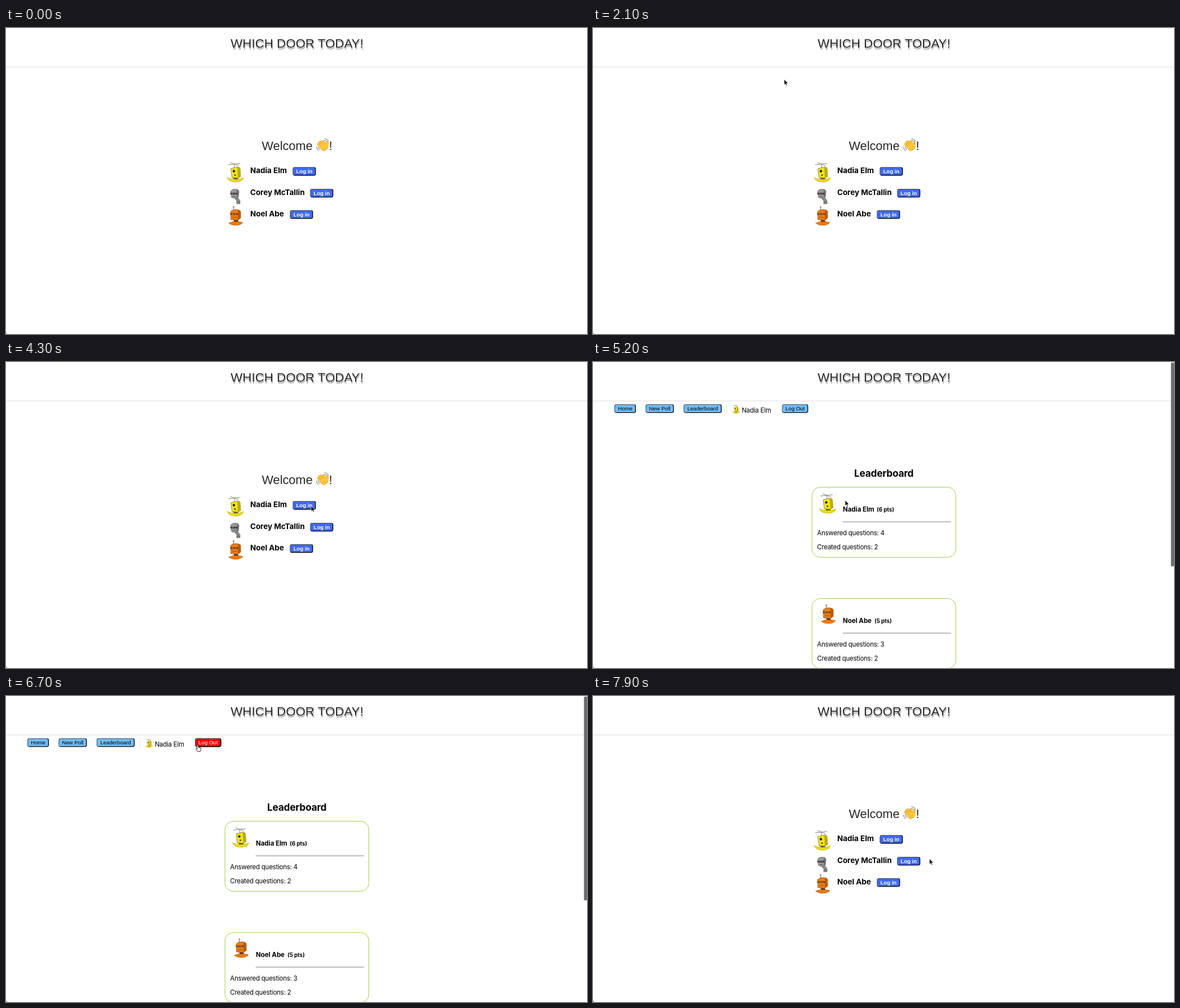
Animation of 1030x544 px, one loop 8 s. Source, as an HTML page:

```html
<!DOCTYPE html>
<html lang="en">
<head>
<meta charset="utf-8">
<title>Poll app</title>
<style>
html, body { margin: 0; width: 100%; height: 100%; overflow: hidden; background: #fff; }
svg { display: block; width: 1030px; height: 544px; }
text { white-space: pre; }
.ui { font-family: Inter, "Noto Sans", sans-serif; fill: #000; }
.reg { font-size: 11.45px; letter-spacing: -.22px; }
.name { font-size: 13.4px; font-weight: 700; }
.sub { font-size: 11.45px; font-weight: 700; }
.pts { font-size: 9.7px; font-weight: 700; }
.head { font-size: 17.2px; font-weight: 700; letter-spacing: -.2px; }
.arial { font-family: "Liberation Sans", Arial, sans-serif; }
.title { font-size: 22.3px; }
.hello { font-size: 21.7px; fill: #262626; }
.btn { font-size: 9.6px; }
</style>
</head>
<body>
<svg viewBox="0 0 1030 544" stroke-linejoin="round" stroke-linecap="round">
  <defs>
    <linearGradient id="edge" x2="1" y2="1">
      <stop offset=".5" stop-color="#44444c"/><stop offset=".5" stop-color="#000"/>
    </linearGradient>

    <g id="yellowBot">
      <path d="M2 5 L23 3 M6 1 L20 7 M13 4 V10" fill="none" stroke="#85857a"/>
      <path d="M0 28 Q15 34 29 28 Q27 36 15 36 Q3 36 0 28Z" fill="#e9da10" stroke="#a89b12" stroke-width=".5"/>
      <path d="M10 27 H20 L19 31 H12Z" fill="#6b641a"/>
      <path d="M7 12 L18 9 Q23 9 23 13 L24 26 L19 29 L9 28Z" fill="#f0e41c" stroke="#625c10" stroke-width=".7"/>
      <path d="M18 9 Q23 9 23 13 L24 26 L19 29Z" fill="#b9ae14"/>
      <circle cx="12" cy="16.500" r="2.200" fill="#25230c"/>
      <circle cx="14" cy="23.500" r="1.500" fill="#4d480f"/>
    </g>

    <g id="greyBot">
      <path d="M8 17 H15 L18 22 V27 H12 V22Z" fill="#8b8b8d" stroke="#555" stroke-width=".6"/>
      <path d="M1 6 Q2 1 9 1 Q16 1 16 6 L15 15 Q10 19 3 16Z" fill="#97979a" stroke="#626264" stroke-width=".7"/>
      <path d="M12 1 Q16 2 16 6 L15 15 L12 17Z" fill="#747477"/>
      <path d="M2 9 H12" stroke="#3e3438" stroke-width="3"/>
      <path d="M4 9 H10 " stroke="#c98d8d" stroke-dasharray="2 3"/>
      <path d="M5 14 H10 M13 24 H17" stroke="#57575a"/>
    </g>

    <g id="orangeBot">
      <path d="M9.500 1 V7" stroke="#77706a"/>
      <circle cx="9.500" cy="1.500" r="1.200" fill="#b25c4a"/>
      <path d="M1 30 L12 26 L26 29 Q22 34 13 34 Q5 34 1 30Z" fill="#e97b14" stroke="#a85208" stroke-width=".6"/>
      <path d="M9 23 H18 L17 28 H11Z" fill="#6e3a10"/>
      <path d="M4 10 Q7 6 13 6 Q21 6 22 10 V21 L17 25 L5 24Z" fill="#ec7c16" stroke="#8a480d" stroke-width=".7"/>
      <path d="M17 7 Q22 7 22 10 V21 L17 25Z" fill="#b85a0c"/>
      <path d="M5 14 H16" stroke="#6a3812" stroke-width="3"/>
      <path d="M7 14 H14" stroke="#f0b36c" stroke-dasharray="2 3"/>
      <path d="M7 20 H15" stroke="#93500f"/>
    </g>

    <g id="wave"></g>
  </defs>

  <g id="header"></g>
  <g id="login"></g>
  <g id="board"></g>
  <path d="M0 541 Q0 544 3 544 H0Z" fill="#444"/>
  <g id="cursor">
    <path id="arrow" d="M0 0 V9.600 L2.200 7.600 L3.700 11 L5.300 10.300 L3.800 7 H6.700Z" fill="#000" stroke="#fff" stroke-width=".7"/>
    <path id="hand" d="M-1 1 Q0 -1 1 1 L2 4.500 L4 5 L6.500 6 V9 L5.500 12 H.5 L-2.500 8 Q-3 6 0 7.500Z" fill="#fff" stroke="#111" stroke-width=".9"/>
  </g>
</svg>
<script>
const $ = id => document.getElementById(id);
const users = [
  { name: "Nadia Elm", bot: "yellowBot", answered: 4, created: 2 },
  { name: "Corey McTallin", bot: "greyBot" },
  { name: "Noel Abe", bot: "orangeBot", answered: 3, created: 2 }
];
const [first, second, third] = users;

const text = (x, y, str, cls, extra = "") =>
  `<text x="${x}" y="${y}" class="${cls}" ${extra}>${str}</text>`;
const use = (id, x, y, scale = 1) =>
  `<use href="#${id}" transform="translate(${x} ${y}) scale(${scale})"/>`;
const line = (x1, x2, y, color) => `<path d="M${x1} ${y} H${x2}" stroke="${color}"/>`;

function button(x, y, w, label, fill, ink, weight = 400) {
  return `<rect x="${x}" y="${y}" width="${w}" height="15.2" rx="3.4" fill="url(#edge)"/>
    <rect x="${x + 1}" y="${y + 1}" width="${w - 2.3}" height="12.9" rx="2.5" fill="${fill}"/>` +
    text(x + w / 2, y + 10.9, label, "arial btn",
      `text-anchor="middle" fill="${ink}" font-weight="${weight}"`);
}

const loginRow = (user, y, botX, botY, buttonX) =>
  use(user.bot, botX, botY) + text(433, y, user.name, "ui name") +
  button(buttonX, y - 11, 41, "Log in", "#416af0", "#fff", 700);

const navButton = (x, w, label) => button(x, 75.3, w, label, "#70bcf6", "#000");

function card(user, y, botX, ptsX) {
  const points = user.answered + user.created;
  return `<rect x="388.2" y="${y}" width="255" height="124.6" rx="14.5" fill="#fff" stroke="#a3cb4c"/>` +
    use(user.bot, botX, y + 10.5) +
    text(443, y + 43, user.name, "ui sub") +
    text(ptsX, y + 43, `(${points} pts)`, "ui pts") +
    line(443, 634, y + 61.5, "#7c7c7c") +
    text(397.3, y + 85, `Answered questions: ${user.answered}`, "ui reg") +
    text(397.3, y + 110, `Created questions: ${user.created}`, "ui reg");
}

const title = (shift, fill) =>
  text(516 + shift / 4, 34.8 + shift, "WHICH DOOR TODAY!", "arial title",
    `text-anchor="middle" fill="${fill}"`);

function waveHand() {
  let shape = "M5 5 L10 0";
  for (let i = 0; i < 4; i++) shape += ` M${i * 3.4 - 5.5} 2 V${(i - 1.2) ** 2 - 9}`;
  const layer = (color, width) =>
    `<path d="${shape}" fill="none" stroke="${color}" stroke-width="${width}"/>`;
  const arc = (r, turn) =>
    `<path d="M${-r / 3} ${-r} Q0 ${-r - 1} ${r / 3} ${-r}" fill="none" stroke="#76858f" transform="rotate(${turn})"/>`;
  return `<g transform="translate(12.5 13)">
    <g transform="rotate(-38)">${layer("#d9931c", 3.6)}
      <rect x="-7" y="-2" width="13.5" height="11" rx="5" fill="#fdc23a" stroke="#d9931c" stroke-width=".5"/>
      ${layer("#ffca3f", 2.6)}</g>
    ${[9, 12].map(r => arc(r, 28) + arc(r, -118)).join("")}
  </g>`;
}

$("wave").innerHTML = waveHand();

$("header").innerHTML =
  title(2.8, "#a2a2a2") + title(1.4, "#fff") + title(0, "#262626") + line(0, 1030, 69.2, "#dcdcdc");

$("login").innerHTML =
  text(453.5, 216.6, "Welcome", "arial hello") + use("wave", 550, 196) +
  text(572.6, 216.6, "!", "arial hello") +
  loginRow(first, 258.2, 392, 238, 508.3) +
  loginRow(second, 297, 397, 285.5, 539.2) +
  loginRow(third, 335, 394, 316.8, 503.3);

$("board").innerHTML =
  navButton(38, 38, "Home") + navButton(93.3, 50, "New Poll") + navButton(160.7, 67.4, "Leaderboard") +
  `<path d="M237 75 V92" stroke="#e2e2e2"/>` +
  use(first.bot, 247, 75.5, .45) + text(263.7, 90, first.name, "ui reg") +
  navButton(335.2, 46.2, "Log Out") +
  `<g id="hot">${button(335.2, 75.3, 46.2, "Log Out", "#fb0007", "#fff")}</g>` +
  text(515.6, 204, "Leaderboard", "ui head", 'text-anchor="middle"') +
  card(first, 222.6, 401.5, 503) + card(third, 420.5, 404, 499) +
  `<rect x="1024.6" y="1" width="5.4" height="362.5" rx="2.2" fill="#6c6c6c"/>`;

// pointer moves: begin, end, x, y
const moves = [
  [200, 1300, 376, 233],
  [1700, 2100, 339, 91.6],
  [2500, 3000, 598, 262],
  [3000, 3300, 540, 253.5],
  [3500, 4100, 541, 256],
  [4600, 5200, 447, 246],
  [5200, 5900, 346, 47],
  [5900, 6300, 339, 86.5],
  [7300, 7900, 596.5, 289.5]
];

function pointer(t) {
  let x = 760, y = 2;
  for (const [begin, end, toX, toY] of moves) {
    const p = Math.min(1, Math.max(0, (t - begin) / (end - begin)));
    const k = p * p * (3 - 2 * p);
    x += (toX - x) * k;
    y += (toY - y) * k;
  }
  return [x, y];
}

const show = (id, on) => $(id).setAttribute("display", on ? "inline" : "none");
const start = performance.now();

function draw(now) {
  const elapsed = Math.max(0, now - start) % 8000;
  const t = Math.floor(elapsed / 100) * 100;
  const board = t >= 4400 && t < 7000;
  const [x, y] = pointer(t);
  const hover = board && x > 335 && x < 381 && y > 75 && y < 91;
  show("login", !board);
  show("board", board);
  show("hot", hover);
  show("cursor", t >= 300);
  show("arrow", !hover);
  show("hand", hover);
  $("cursor").setAttribute("transform", `translate(${x} ${y})`);
  requestAnimationFrame(draw);
}
draw(start);
</script>
</body>
</html>
```
